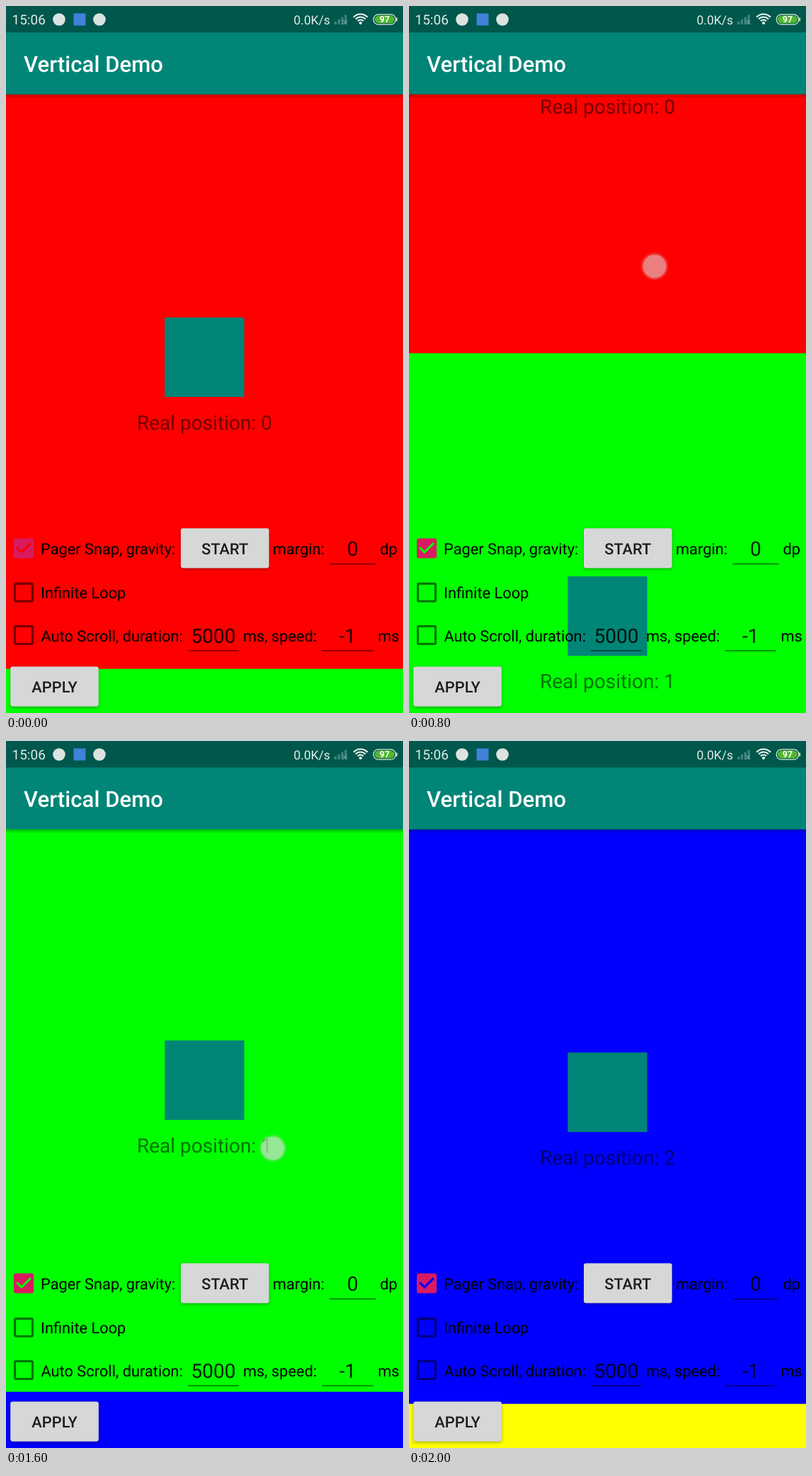
Write an HTML page with a canvas that moves like this. It is 561 px wide and 998 px high and loops after 3300 ms.

```html
<!DOCTYPE html>
<html lang="en">
<head>
<meta charset="utf-8">
<title>Vertical Demo</title>
<style>
  html, body { margin: 0; width: 100%; height: 100%; overflow: hidden; background: #008577; }
  canvas { display: block; width: 561px; height: 998px; }
</style>
</head>
<body>
<canvas id="stage" width="561" height="998"></canvas>
<script>
const ctx = document.getElementById('stage').getContext('2d');
const W = 561, H = 998, LOOP = 3300, TICK = 100;
const DP = W / 360;
const STATUS = 24 * DP, TOP = 80 * DP, PAGE = 811;
const PAGES = ['#f00', '#0f0', '#00f', '#ff0'];
const TEAL = '#008577', INK = 'rgba(0,0,0,.87)', DIM = 'rgba(0,0,0,.54)';
const SMALL = 14 * DP, MEDIUM = 18 * DP, LARGE = 20 * DP;

// Scroll offset over time: drag, fling, settle on the next page.
const SCROLL = [
  [600, 0], [700, 95], [800, 445.5], [900, 690], [1000, 788], [1100, 811],
  [1500, 811], [1600, 828], [1700, 930], [1800, 1333.5], [1900, 1556], [2000, 1622]
];
const SWIPES = [
  { start: 600, from: [382.5, 571.5], to: [347, 367.5] },
  { start: 1600, from: [377, 575], to: [346, 363.5] }
];
const SWIPE_MS = 200;

function keyed(keys, t) {
  if (t <= keys[0][0]) return keys[0][1];
  for (let i = 1; i < keys.length; i++) {
    const [t0, a] = keys[i - 1], [t1, b] = keys[i];
    if (t <= t1) return a + (b - a) * (t - t0) / (t1 - t0);
  }
  return keys[keys.length - 1][1];
}

function rect(x, y, w, h, color) {
  ctx.fillStyle = color;
  ctx.fillRect(x, y, w, h);
}

function rounded(x, y, w, h, r) {
  ctx.beginPath();
  ctx.roundRect(x, y, w, h, r);
}

function disc(x, y, r, color) {
  ctx.fillStyle = color;
  ctx.beginPath();
  ctx.arc(x, y, r, 0, Math.PI * 2);
  ctx.fill();
}

function text(str, x, y, size, color, align = 'left', weight = 400) {
  ctx.font = `${weight} ${size}px Roboto, sans-serif`;
  ctx.textRendering = 'geometricPrecision';
  ctx.textAlign = align;
  ctx.fillStyle = color;
  ctx.fillText(str, x, y);
}

function drawPages(scroll) {
  PAGES.forEach((color, i) => {
    const y = TOP + i * PAGE - scroll;
    if (y > H || y + PAGE < TOP) return;
    rect(0, y, W, H - y, color);
    rect(144 * DP, y + 315, 72 * DP, 72 * DP, TEAL);
    text('Real position: ' + i, W / 2, y + 473.3, MEDIUM, DIM, 'center');
  });
}

function drawButton(label, x, y) {
  const w = 80 * DP, h = 36 * DP;
  ctx.save();
  ctx.shadowColor = 'rgba(0,0,0,.32)';
  ctx.shadowBlur = 4;
  ctx.shadowOffsetY = 1.5;
  ctx.fillStyle = '#d6d7d7';
  rounded(x, y, w, h, 2 * DP);
  ctx.fill();
  ctx.restore();
  text(label, x + w / 2, y + h / 2 + 8.5, SMALL, INK, 'center', 500);
}

function drawField(value, x, w, line) {
  text(value, x + w / 2, line - 11.5, MEDIUM, INK, 'center');
  rect(x, line - 0.7, w, 1.5, DIM);
}

function drawBox(y) {
  ctx.strokeStyle = DIM;
  ctx.lineWidth = 2 * DP;
  rounded(11 + DP, y + DP, 16 * DP, 16 * DP, DP);
  ctx.stroke();
}

function drawChecked(y, under) {
  ctx.fillStyle = '#d81b60';
  rounded(11, y, 18 * DP, 18 * DP, 2 * DP);
  ctx.fill();
  ctx.strokeStyle = under;
  ctx.lineWidth = 2 * DP;
  ctx.beginPath();
  ctx.moveTo(11 + 2.7 * DP, y + 8.3 * DP);
  ctx.lineTo(11 + 7 * DP, y + 12.6 * DP);
  ctx.lineTo(11 + 15.3 * DP, y + 4.3 * DP);
  ctx.stroke();
}

function drawControls(scroll) {
  const label = (str, x, y) => text(str, x, y, SMALL, '#000');

  drawChecked(751.5, PAGES[Math.floor((766 - TOP + scroll) / PAGE)]);
  label('Pager Snap, gravity:', 49, 774);
  drawButton('START', 247, 737.3);
  label('margin:', 377, 774);
  drawField('0', 457.5, 65, 787.5);
  label('dp', 528.5, 774);

  drawBox(813.8);
  label('Infinite Loop', 49, 836);

  drawBox(874);
  label('Auto Scroll, duration:', 49.5, 896.5);
  drawField('5000', 257, 72, 910);
  label('ms, speed:', 335, 896.5);
  drawField('-1', 446.5, 72.5, 910);
  label('ms', 525.5, 896.5);

  drawButton('APPLY', 4 * DP, H - 42 * DP);
}

function drawSignal() {
  for (let i = 0; i < 4; i++) {
    const h = 4 + i * 3.2;
    rect(464 + i * 4.8, 26 - h, 3.2, h, 'rgba(255,255,255,.26)');
  }
  ctx.strokeStyle = 'rgba(255,255,255,.3)';
  ctx.lineWidth = 1.2;
  ctx.beginPath();
  ctx.moveTo(476, 20); ctx.lineTo(482, 26);
  ctx.moveTo(482, 20); ctx.lineTo(476, 26);
  ctx.stroke();
}

function drawWifi() {
  ctx.strokeStyle = '#eef5f3';
  ctx.lineWidth = 2.2;
  for (const r of [5.5, 9.5, 13.5]) {
    ctx.beginPath();
    ctx.arc(501, 25, r, -Math.PI * 0.76, -Math.PI * 0.24);
    ctx.stroke();
  }
  disc(501, 24, 2.1, '#eef5f3');
}

function drawBattery() {
  ctx.strokeStyle = '#dcebe0';
  ctx.lineWidth = 1.3;
  rounded(519.2, 11.8, 31.6, 14.4, 7.2);
  ctx.stroke();
  ctx.fillStyle = '#4fb82e';
  rounded(521, 13.6, 28, 10.8, 5.4);
  ctx.fill();
  rect(551.4, 16.5, 1.6, 5, '#dcebe0');
  text('97', 535, 23.4, 12.5, '#fff', 'center', 700);
}

function drawBars() {
  rect(0, 0, W, TOP, TEAL);
  rect(0, 0, W, STATUS, '#00574b');

  const shade = ctx.createLinearGradient(0, TOP, 0, TOP + 6);
  shade.addColorStop(0, 'rgba(0,0,0,.26)');
  shade.addColorStop(1, 'rgba(0,0,0,0)');
  rect(0, TOP, W, 6, shade);

  text('Vertical Demo', 16 * DP, 93.2, LARGE, '#fff', 'left', 500);
  text('15:06', 8.5, 26, 19, '#e0ece9');
  disc(75, 19, 8.8, '#dce3e1');
  rect(95.5, 10.5, 17, 17, '#3f82d8');
  disc(132, 19, 8.8, '#dce3e1');
  text('0.0K/s', 406.5, 25.5, 17.5, '#e0ece9');
  drawSignal();
  drawWifi();
  drawBattery();
}

function drawTouch(t) {
  for (const { start, from, to } of SWIPES) {
    const p = (t - start) / SWIPE_MS;
    if (p < 0 || p > 1) continue;
    const k = Math.pow(p, 1.1);
    const x = from[0] + (to[0] - from[0]) * k;
    const y = from[1] + (to[1] - from[1]) * k;
    const alpha = 0.68 - 0.1 * p;
    const glow = ctx.createRadialGradient(x, y, 15.5, x, y, 20.5);
    glow.addColorStop(0, `rgba(220,220,220,${alpha})`);
    glow.addColorStop(0.35, `rgba(205,205,205,${alpha * 0.45})`);
    glow.addColorStop(1, 'rgba(200,200,200,0)');
    disc(x, y, 20.5, glow);
  }
}

function draw(now) {
  const t = Math.floor(now % LOOP / TICK) * TICK;
  const scroll = keyed(SCROLL, t);
  drawPages(scroll);
  drawControls(scroll);
  drawBars();
  drawTouch(t);
}

function loop() {
  draw(performance.now());
  requestAnimationFrame(loop);
}
loop();
</script>
</body>
</html>
```
